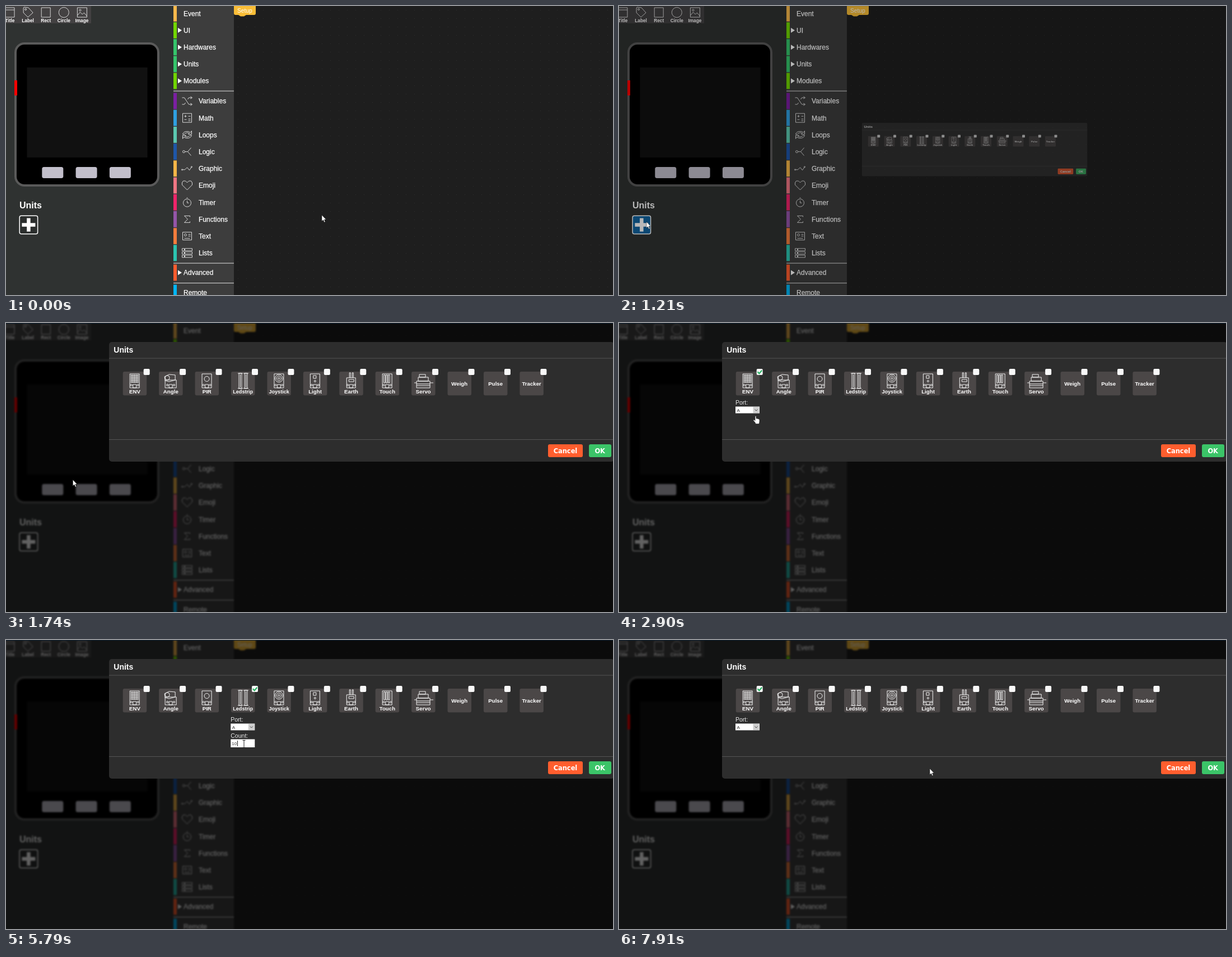
Recreate the animation shown at these times as an HTML page. Size 1084 by 517 pixels, loop 8000 ms.

```html
<!DOCTYPE html>
<html lang="en">
<head>
<meta charset="utf-8">
<title>Units dialog</title>
<style>
html, body { margin: 0; width: 100%; height: 100%; overflow: hidden; background: #0a0a0a; }
svg { display: block; width: 1084px; height: 517px; }
text { font-family: "Liberation Sans", Arial, sans-serif; fill: #fff; white-space: pre; }
.b { font-weight: 700; }
.m { text-anchor: middle; }
.menu { font-size: 12px; stroke: #fff; stroke-width: .25; }
.tool { font-size: 8.3px; }
.unit { font-size: 9.7px; }
.tight { font-size: 9.1px; }
.field { font-size: 10.5px; fill: #e8e8e8; }
.value { font-size: 8px; fill: #333; }
.icon { fill: none; stroke: #d8d8d8; }
.art { fill: none; stroke: #f4f4f4; }
.btn { font: 700 11.4px "DejaVu Sans", sans-serif; text-anchor: middle; }
</style>
</head>
<body>
<svg viewBox="0 0 1084 517">
  <defs>
    <pattern id="dots" x="414" y="7" width="15" height="15" patternUnits="userSpaceOnUse">
      <rect width="1" height="1" fill="#303030"/>
    </pattern>
  </defs>
  <g id="page"></g>
  <rect id="edge" width="1084" height="1" fill="#0b1c2c"/>
  <g id="modal"></g>
  <g id="cursor">
    <path id="arrow" d="M0 0V11L2.6 8.7L4.4 12.9L6.1 12.1L4.4 8.1H7.6Z" fill="#fff" stroke="#111" stroke-width=".5"/>
    <path id="hand" d="M-1 1Q0-.6 1 1V5Q2 4 3 5.2Q4.2 4.6 5 5.8Q7 5.4 7 7.5V10Q7 12 6 14.5H0L-1 12L-4 8.5Q-4 6.6-2.4 7.2L-1 8.6Z" fill="#fff" stroke="#111" stroke-width=".6"/>
    <path id="beam" d="M-2.5-6.5H2.5M0-6.5V6.5M-2.5 6.5H2.5" fill="none" stroke="#222"/>
  </g>
</svg>
<script>
const $ = id => document.getElementById(id);
const rect = (x, y, w, h, fill, r = 0, more = '') =>
  `<rect x="${x}" y="${y}" width="${w}" height="${h}" rx="${r}" fill="${fill}" ${more}/>`;
const text = (x, y, s, cls = '', size = '') =>
  `<text x="${x}" y="${y}" class="${cls}"${size && ` style="font-size:${size}px"`}>${s}</text>`;
const icon = (x, y, d, cls = 'icon') => `<path class="${cls}" transform="translate(${x} ${y})" d="${d}"/>`;
const ring = (x, y, r) => `M${x - r} ${y}a${r} ${r} 0 1 0 ${2 * r} 0a${r} ${r} 0 1 0 ${-2 * r} 0`;
const box = (x, y, w, h) => `M${x} ${y}h${w}v${h}h${-w}z`;
const times = (n, f) => Array.from({ length: n }, (_, i) => f(i)).join('');

// ---- page behind the dialog ----
const tools = [
  ['Title', box(-8, 3, 16, 17) + 'M-8 7h16'],
  ['Label', 'M-8 4l1-2 8 1 8 9-9 8-8-8z' + ring(-4, 6, 1.5)],
  ['Rect', box(-8, 3, 16, 17)],
  ['Circle', ring(0, 11.5, 9)],
  ['Image', box(-8, 3, 17, 17) + 'M-8 17l5-6 4 4 3-3 5 6' + ring(-3, 7.5, 1.6)]
];
const groups = [['Event', '#f7b84b'], ['UI', '#72d600'], ['Hardwares', '#35c46b'], ['Units', '#35c46b'], ['Modules', '#70d400']];
const arrows = 'M-8-1a8 6 0 0 1 14-3l2-3v6h-6l2-2a6 4 0 0 0-9 2z';
const blocks = [
  ['Variables', '#7b1fa2', 'M-9-6h4l8 12h5M-9 6h4l2-3M1-3l2-3h5M6-8l3 2-3 2M6 4l3 2-3 2'],
  ['Math', '#2f9fe0', box(-8, -8, 16, 16) + 'M-5-3h4M-3-5v4M2-3h4M-5 3h4M2 2h4M2 5h4'],
  ['Loops', '#5bc8b0', arrows + 'M8 1a8 6 0 0 1-14 3l-2 3v-6h6l-2 2a6 4 0 0 0 9-2z'],
  ['Logic', '#1e56a8', ring(-6, 0, 2) + 'M-4 0h5l6-7M1 0l6 7'],
  ['Graphic', '#f5b547', 'M-9 2h5l4-4 4 5 4-6' + ring(-9, 2, 1) + ring(8, -3, 1)],
  ['Emoji', '#ef7583', 'M0-5l3-3h4l2 3v4l-9 9-9-9v-4l2-3h4z'],
  ['Timer', '#f0246a', ring(0, 1, 7) + 'M0-3v4h3M-1-8h2'],
  ['Functions', '#9455a8', 'M5-4v-2h-10l6 6-6 6h10v-2'],
  ['Text', '#f47c3c', box(-8, -7, 16, 14) + ring(-3, -2, 2) + 'M2-3h4M2 0h4M-5 4h10'],
  ['Lists', '#2bc4b0', times(3, i => box(-9, 6 * i - 8, 4, 4) + box(-4, 6 * i - 8, 13, 4))]
];
const rowStep = 30.2;

function menuRow(y, name, fill, x, opens) {
  return rect(299, y - 14.4, 6, 28.8, fill) + text(x, y + 4.3, name, 'menu') +
    (opens ? `<path d="M307 ${y - 4.5}l7 4.5-7 4.5z" fill="#fff"/>` : '');
}

function buildPage() {
  let s = rect(-20, -20, 330, 560, '#2f3231') + rect(407, -20, 700, 560, '#1e1e1e') +
    rect(407, 0, 677, 517, 'url(#dots)') +
    rect(-20, -20, 172, 51, '#434142') + rect(299, -20, 108, 560, '#3d3d3d');
  tools.forEach(([name, d], i) => {
    const x = 7 + 32.1 * i;
    s += icon(x, 0, d) + text(x, 29, name, 'tool b m');
  });
  s += rect(17, 67, 255, 254, '#000', 16, 'stroke="#5a5a5a" stroke-width="4"') +
    rect(37.5, 110, 215, 161, '#111') + rect(15, 133, 5, 27, '#f00') +
    times(3, i => rect(64.3 + 60.3 * i, 288, 38, 20, '#c2bfcb', 3.5));
  groups.forEach(([name, fill], i) => s += menuRow(13.3 + rowStep * i, name, fill, 317, i));
  blocks.forEach(([name, fill, d], i) => {
    const y = 170 + rowStep * i;
    s += menuRow(y, name, fill, 344) + icon(323.5, y, d);
  });
  s += menuRow(477, 'Advanced', '#ff5c2e', 317, true) + menuRow(513, 'Remote', '#00b5f5', 317);
  for (const y of [152, 460, 495.5]) s += rect(299, y - .5, 108, 1.2, '#c8c8c8');
  return s + '<path d="M407-20H446V13Q446 16 443 16H429L425 18.5H419L415 16H410Q407 16 407 13Z" fill="#f9bd37"/>' +
    text(413, 11.5, 'Setup', '', 10.2) + text(24, 362, 'Units', 'b', 16) +
    rect(24.2, 375.2, 32.4, 32.6, '', 3, 'id="add" stroke="#fff" stroke-width="1.5"') +
    '<path d="M40.4 379.5V403.5M28.4 391.5H52.4" stroke="#fff" stroke-width="6.5"/>';
}

// ---- dialog ----
const holes = ring(15, 24, 1.5) + ring(27, 24, 1.5) + box(18, 23, 6, 6);
const board = box(12.5, 4, 17, 25) + holes;
const ledBar = x => box(x, 3, 5, 27) + `M${x - 2} 3h9M${x - 2} 30h9M${x + 2.5} 5v23`;
const units = [
  ['ENV', board + times(5, i => `M14 ${7 + 3 * i}h14M${15 + 3 * i} 5v15`)],
  ['Angle', box(11, 15, 20, 14) + holes + 'M10 9l8-4 11 1v9l-11 3-7-2z' + ring(15, 11, 4)],
  ['PIR', board + ring(21, 13, 4.5)],
  ['Ledstrip', ledBar(14) + ledBar(24)],
  ['Joystick', board + times(3, i => ring(21, 12, 1.5 + 2.7 * i))],
  ['Light', board + box(18, 7, 5, 5) + ring(21, 17, 1.5)],
  ['Earth', box(13, 11, 16, 18) + holes + 'M18 11V2h2v9M23 11V2h2v9M17 14h9v4h-9z'],
  ['Touch', board + times(3, i => box(15 + 4 * i, 6, 2.5, 14))],
  ['Servo', box(9, 17, 24, 12) + box(12, 10, 18, 7) + box(14, 5, 11, 5) + 'M5 20h4M33 20h6M9 22h24M9 25h24'],
  ['Weigh'], ['Pulse'], ['Tracker']
];
const pitch = 64.43;

const select = (x, id) => text(x, 146, 'Port:', 'field') + rect(x, 149.5, 43, 12, '#fff') +
  text(x + 2.5, 158.5, 'A', 'value') + rect(x + 31.5, 150, 11, 11, '#cfcfcf', 0, `id="${id}"`) +
  `<path d="M${x + 34.5} 154.5l2.5 2.5 2.5-2.5" fill="none" stroke="#444"/>`;
const tickMark = (x, id) => `<path id="${id}" d="M${x} 87.3l2.9 3 4.9-5.6" fill="none" stroke="#2cb566" stroke-width="2.2"/>`;

function buildModal() {
  let s = rect(184, 34, 902, 214, '#2d2d2d', 5) + text(192.3, 53.3, 'Units', 'b', 14) +
    rect(184, 62.6, 902, 1, '#545454') + rect(184, 208, 902, 1, '#545454');
  units.forEach(([name, d], i) => {
    const x = 208.7 + pitch * i;
    s += rect(x, 87, 42.5, 42.5, '#4b4747', 3) + (d ? icon(x, 87, d, 'art') : '') +
      text(x + 21.2, d ? 126 : 112, name, 'b m ' + (name.length > 7 ? 'tight' : 'unit')) +
      rect(x + 37, 82, 11, 11, '#f8f8f8', 2);
  });
  const x = 208 + 3 * pitch;
  return s + '<g id="env">' + tickMark(247.5, 'tickEnv') + select(208, 'drop') +
    '<g id="list">' + rect(208, 161.5, 43, 44, '#fff') + rect(208.5, 162, 42, 14, '#8cc4f4') +
    times(3, i => text(210.5, 171.5 + 14.5 * i, 'ABC'[i], 'value')) + '</g></g>' +
    '<g id="leds">' + tickMark(247.5 + 3 * pitch, 'tickLeds') + select(x, 'dropLeds') +
    text(x, 174.5, 'Count:', 'field') + rect(x, 177.5, 43, 14.5, '#fff') +
    text(x + 2, 188, '10', 'value') + rect(x + 11.7, 180, .9, 10, '#111', 0, 'id="caret"') + '</g>' +
    rect(968, 217, 62, 23, '#ff5e2e', 3) + text(999, 232.8, 'Cancel', 'btn') +
    rect(1041, 217, 40, 23, '#3bc468', 3) + text(1060.7, 232.8, 'OK', 'btn');
}

$('page').innerHTML = buildPage();
$('modal').innerHTML = buildModal();

// ---- motion ----
// Pointer moves: start, steps, step length, end point, shape, upward bend
const moves = [
  [250, 7, 120, 49, 386, 'arrow', 42],
  [1090, 3, 120, 49, 386, 'arrow'],
  [1480, 5, 135, 249, 86, 'hand'],
  [2630, 3, 135, 244, 166, 'hand'],
  [3020, 2, 120, 245, 153, 'arrow'],
  [4280, 3, 120, 427, 88, 'hand'],
  [4670, 2, 120, 443, 85, 'hand'],
  [5030, 4, 120, 428, 185, 'beam'],
  [5670, 2, 120, 425, 186, 'beam'],
  [6290, 5, 120, 235, 92, 'hand'],
  [6920, 2, 120, 249, 84, 'hand'],
  [7160, 5, 120, 359, 269, 'arrow'],
  [7760, 2, 150, 555, 230, 'arrow']
];
const clamp = u => Math.min(1, Math.max(0, u));
const smooth = u => u * u * (3 - 2 * u);
const within = (t, a, b) => t >= a && t < b;
const show = (id, on) => $(id).setAttribute('visibility', on ? 'inherit' : 'hidden');

function pointerAt(t) {
  let p = { x: 564, y: 374, shape: 'arrow', held: 0 };
  for (const [start, steps, len, x, y, shape, bend = 0] of moves) {
    if (t < start) break;
    const n = Math.min(steps, 1 + Math.floor((t - start) / len));
    const u = n / steps, e = smooth(u);
    p = {
      x: p.x + (x - p.x) * e,
      y: p.y + (y - p.y) * e - 4 * bend * e * (1 - e),
      shape: u > .6 ? shape : p.shape === shape ? shape : 'arrow',
      held: start + (n - 1) * len
    };
  }
  return p;
}

function draw(t) {
  const p = pointerAt(t);
  const open = smooth(clamp((p.held - 1055) / 334));
  $('page').style.filter = open ? `brightness(${1 - .62 * open}) blur(${1.4 * open ** 3}px)` : 'none';
  $('edge').setAttribute('opacity', open ** 3);
  $('modal').setAttribute('transform', `translate(635 350) scale(${open}) translate(-635 -350)`);
  $('modal').setAttribute('opacity', open ** .8);
  $('add').setAttribute('fill', within(t, 970, 1480) ? '#10639f' : '#2b2e2d');

  const leds = within(t, 4910, 7040);
  show('env', t >= 2140 && !leds);
  show('leds', leds);
  show('list', within(t, 3260, 3910));
  show('caret', within(t, 5670, 7040));
  // a hidden parent must hide its children as well
  $('env').setAttribute('display', t >= 2140 && !leds ? 'inline' : 'none');
  $('leds').setAttribute('display', leds ? 'inline' : 'none');
  const hot = within(t, 3140, 4910);
  $('drop').setAttribute('fill', hot ? '#cfe7fb' : '#cfcfcf');
  $('drop').setAttribute('stroke', hot ? '#2f8ee0' : 'none');

  $('cursor').setAttribute('transform', `translate(${p.x} ${p.y})`);
  for (const id of ['arrow', 'hand', 'beam']) show(id, id === p.shape);
}

const begin = performance.now();
function tick() {
  draw((performance.now() - begin) % 8000);
  requestAnimationFrame(tick);
}
tick();
</script>
</body>
</html>
```
